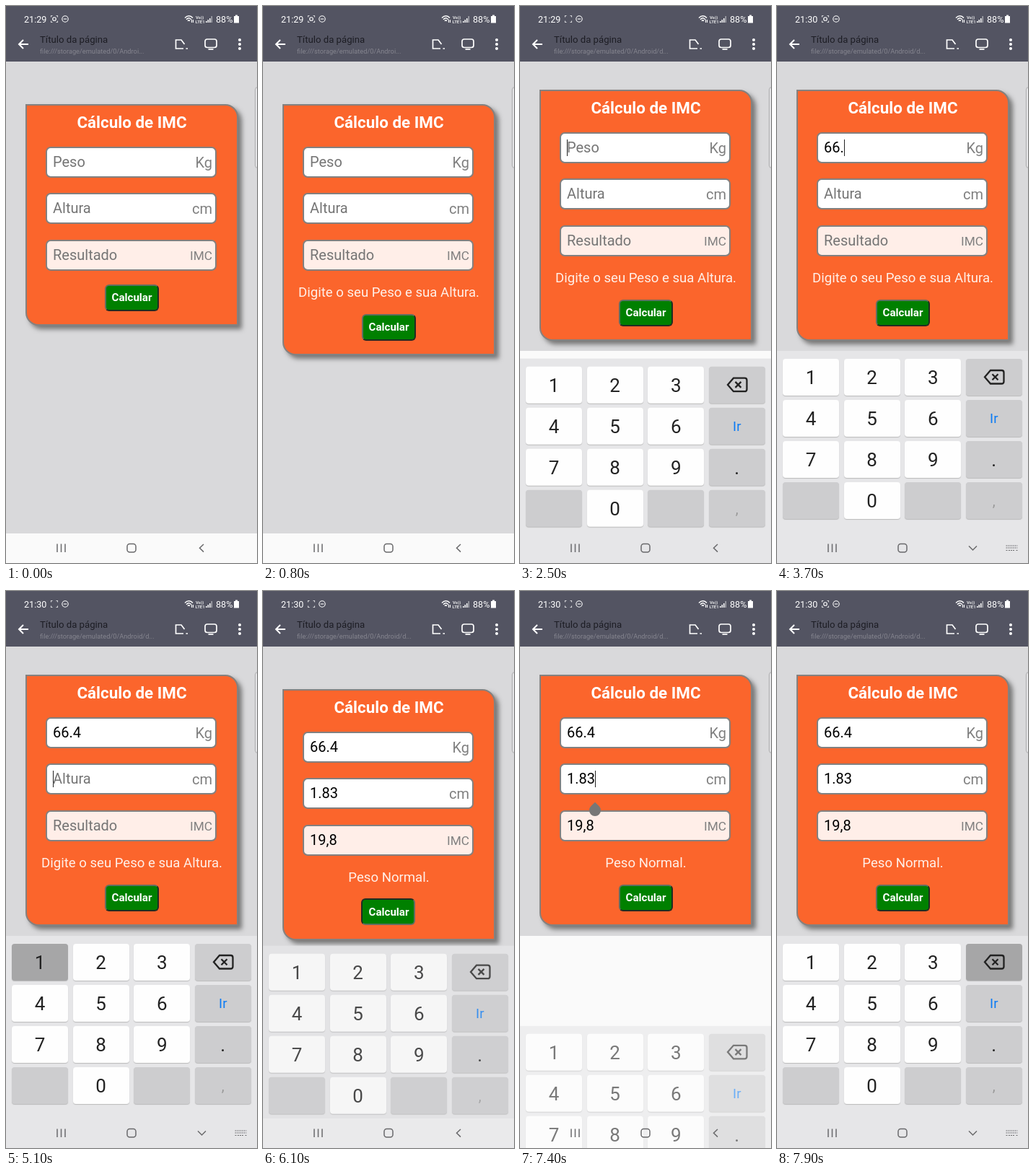
These frames come from a looping animation (348 px wide and 772 px high, 8 s). An HTML page:

```html
<!DOCTYPE html>
<html lang="pt">
<head>
<meta charset="utf-8">
<title>Cálculo de IMC</title>
<style>
* { box-sizing: border-box; }
html, body { margin: 0; width: 100%; height: 100%; overflow: hidden; background: #fafafa; }
#stage { position: relative; width: 348px; height: 772px; overflow: hidden; font-family: Roboto, sans-serif; }
#stage div, svg { position: absolute; }
svg { left: 0; top: 0; }
#page { left: 0; top: 77px; width: 348px; background: #d9d9db; overflow: hidden; }
#body { left: 0; top: 0; width: 348px; height: 654px; }
#card { left: 27px; top: 59px; width: 295px; background: #fb652c; border: 2px solid #85817f;
  border-radius: 0 18px 0 18px; box-shadow: 5px 5px 6px #777; }
#body .line { left: 0; width: 349px; text-align: center; color: #fff; }
#title { top: 70px; font: bold 22.4px/28px Roboto, sans-serif; }
#msg { top: 308px; font-size: 18.6px; line-height: 24px; color: #ffefe8 !important; }
.field { left: 55px; width: 237px; height: 43px; border: 2px solid #83807f; border-radius: 7px; background: #fff;
  padding-left: 8px; font-size: 20px; line-height: 39px; color: #000; white-space: pre; }
.field u { color: #757575; text-decoration: none; }
.field b { position: absolute; right: 4px; top: 1px; font-weight: 400; color: #808080; }
.field i { display: inline-block; width: 1.4px; height: 23px; margin-right: -1.4px; vertical-align: -5px; background: #222; }
#f2 { background: #ffeee8; }
#f2 b { font-size: 17.3px; }
#btn { left: 137px; width: 75px; height: 37px; border: 2px solid; border-color: #5f6f5f #222c22 #222c22 #5f6f5f;
  border-radius: 6px; color: #fff; font: bold 15.1px/33px Roboto, sans-serif; text-align: center; }
#btn.held { border-color: #222c22 #5f6f5f #5f6f5f #222c22; transform: translate(-1px, -1px); padding: 1px 0 0 2px; }
#drop { left: 95.5px; top: 239px; width: 16px; height: 16px; border-radius: 0 50% 50% 50%; transform: rotate(45deg); background: #777; }
#edge { left: 345px; top: 112px; width: 8px; height: 113px; border: 1px solid #aaaaac; border-radius: 4px; background: #e6e6e8; }
#kb { left: 0; top: 478px; width: 348px; height: 294px; background: #e6e6e8; }
.key { width: 78px; height: 51px; border-radius: 4px; font-size: 26px; line-height: 53px; text-align: center; color: #222;
  box-shadow: 0 1px 1px #bbb; }
</style>
</head>
<body>
<div id="stage">
  <div id="page"><div id="body">
    <div id="card"></div>
    <div id="title" class="line">Cálculo de IMC</div>
    <div id="f0" class="field" style="top:118px"></div>
    <div id="f1" class="field" style="top:182px"></div>
    <div id="f2" class="field" style="top:247px"></div>
    <div id="msg" class="line"></div>
    <div id="btn">Calcular</div>
    <div id="drop"></div>
  </div></div>
  <div id="edge"></div>
  <div id="kb"></div>
  <svg width="348" height="772" fill="none" stroke="#fff" stroke-width="2" font-family="Roboto, sans-serif">
    <path d="M0 0H348V77H0Z" fill="#535462" stroke="none"/>
    <g fill="#fff" stroke="none" font-size="12.6">
      <text id="clock" x="25" y="22.6"></text>
      <text x="291" y="22.6">88%</text>
      <g font-size="6" font-weight="bold" opacity=".85">
        <text x="263" y="17.5">Vo))</text>
        <text x="262.5" y="23.5">LTE1</text>
      </g>
      <path d="M316 14h2v-1.500h3V14h2V23.500H316Z"/>
      <path d="M277 21h1.500v2H277ZM279.500 19H281v4H279.500ZM282 17h1.500v6H282Z"/>
      <path d="M284.500 14H286v9H284.500Z" opacity=".5"/>
      <text x="47" y="51" font-size="13.2" fill="#1d1d24">Título da página</text>
      <text id="url" x="47" y="66" font-size="9.25" fill="#85858f"></text>
      <circle cx="324" cy="47" r="2"/><circle cx="324" cy="53" r="2"/><circle cx="324" cy="59" r="2"/>
    </g>
    <g stroke-width="1.1">
      <path d="M62.500 15.500V13.500H64.500M69.500 13.500H71.500V15.500M71.500 20.500V22.500H69.500M64.500 22.500H62.500V20.500" opacity=".75"/>
      <circle id="rec" cx="67" cy="18" r="2.300"/>
      <circle cx="82" cy="18" r="4.200"/><path d="M79.800 18H84.200"/>
      <path d="M248 16.500Q253.500 11 259 16.500M250 18.700Q253.500 15 257 18.700M252 20.700Q253.500 19 255 20.700" stroke-width="1.500"/>
      <path d="M257.500 19v4M259.500 19v4"/>
    </g>
    <path d="M31 53H18M24 47L18 53L24 59"/>
    <path d="M246 59H235.500V47H243L247.500 53M249.500 59H252" stroke-width="1.700"/>
    <rect x="276" y="46" width="16" height="11.500" rx="3" stroke-width="1.700"/>
    <path d="M280.500 60H287.500" stroke-width="1.700"/>
    <g stroke="#6a6a6c" stroke-width="1.500">
      <path d="M71 745.500V757M76.500 745.500V757M82 745.500V757"/>
      <rect x="168" y="745.500" width="12" height="11.500" rx="3.500"/>
      <path id="back" d="M274 746L268.500 751.300L274 756.600"/>
      <path id="down" d="M266 748.500L271.500 754L277 748.500"/>
      <path id="pad" d="M317.500 748H333.500M317.500 751H333.500M317.500 754.500H319.500M321 754.500H330M331.500 754.500H333.500" stroke-width="1.200" stroke-dasharray="2 1"/>
    </g>
  </svg>
</div>
<script>
const $ = id => document.getElementById(id);
const LOOP = 8000, CLOSE = 6045, OPENS = [2250, 7293];
const labels = ['1', '2', '3', '⌫', '4', '5', '6', 'Ir', '7', '8', '9', '.', '', '0', '', ','];
const backspace = '<svg width="78" height="51" fill="none" stroke="#222" stroke-width="2.3"><path d="M34 16H49.500Q52.500 16 52.500 19V31.500Q52.500 34.500 49.500 34.500H34L26 25.250ZM36.500 21.250L44.500 29.250M44.500 21.250L36.500 29.250"/></svg>';
// key label, press time, release time
const presses = [['6', 2950, 3080], ['6', 3200, 3300], ['.', 3500, 3600],
  ['1', 5050, 5190], ['.', 5230, 5290], ['8', 5350, 5440], ['3', 5500, 5590], ['⌫', 7850, 8000]];
// time, text
const weight = [[3080, '6'], [3300, '66'], [3600, '66.'], [3900, '66.4']];
const height = [[5190, '1'], [5290, '1.'], [5440, '1.8'], [5590, '1.83']];

const keys = labels.map((label, i) => {
  const key = document.createElement('div');
  key.className = 'key';
  key.style.left = 8 + i % 4 * 84.6 + 'px';
  key.style.top = 10.5 + (i >> 2) * 57 + 'px';
  if (label === '⌫') key.innerHTML = backspace;
  else key.textContent = label;
  if (label === 'Ir') Object.assign(key.style, { color: '#0b7bf5', fontSize: '18.6px' });
  if (label === ',') Object.assign(key.style, { color: '#999', fontSize: '20px' });
  $('kb').append(key);
  return { key, label, base: i % 4 === 3 || !label ? '#cdcdcf' : '#fefefe' };
});

const within = (t, a, b) => t >= a && t < b;
const latest = (steps, t) => steps.filter(s => s[0] <= t).pop() || [0, ''];
const show = (id, on) => $(id).style.visibility = on ? 'visible' : 'hidden';

function field(id, text, hint, unit, caret) {
  const bar = caret ? '<i></i>' : '';
  const html = (text ? text + bar : `${bar}<u>${hint}</u>`) + `<b>${unit}</b>`;
  const el = $(id);
  if (el.last !== html) el.innerHTML = el.last = html;
}

function drawKeyboard(t) {
  let shift = 294, alpha = 0, open = false;
  if (within(t, CLOSE, CLOSE + 260)) {
    const q = (t - CLOSE) / 260;
    shift = 294 * q * q;
    alpha = 1 - q;
  } else if (within(t, OPENS[0], CLOSE) || t >= OPENS[1]) {
    const p = Math.min(1, (t - OPENS[t < CLOSE ? 0 : 1]) / 310);
    shift = 294 * (1 - p) ** 2;
    alpha = Math.min(1, p * 1.7);
    open = p === 1;
  }
  $('kb').style.transform = `translateY(${shift}px)`;
  $('kb').style.opacity = alpha;
  show('back', !open);
  show('down', open);
  show('pad', open);
  for (const { key, label, base } of keys) {
    const held = presses.some(p => p[0] === label && within(t, p[1], p[2]));
    key.style.background = held ? '#a6a6a7' : base;
  }
}

function drawForm(t) {
  const w = latest(weight, t), h = latest(height, t), done = t >= 5950;
  const focus = within(t, 2150, 4100) ? 0 : within(t, 4100, 5900) || t >= 7250 ? 1 : -1;
  const since = t >= 7250 ? 7250 : focus ? Math.max(4100, h[0]) : Math.max(2150, w[0]);
  const lit = (t - since) % 1000 < 500;
  field('f0', w[1], 'Peso', 'Kg', focus === 0 && lit);
  field('f1', h[1], 'Altura', 'cm', focus === 1 && lit);
  field('f2', done ? '19,8' : '', 'Resultado', 'IMC', false);

  const asked = t >= 600, small = within(t, OPENS[0], CLOSE) || t >= OPENS[1];
  $('msg').textContent = done ? 'Peso Normal.' : asked ? 'Digite o seu Peso e sua Altura.' : '';
  $('card').style.height = (asked ? 348 : 307) + 'px';
  $('page').style.height = (small ? 401 : 654) + 'px';
  $('body').style.top = (small ? -20 : 0) + 'px';
  $('btn').style.top = (asked ? 350 : 309) + 'px';
  $('btn').style.background = within(t, 1100, 2000) ? '#009800' : '#008000';
  $('btn').className = within(t, 450, 650) || within(t, 5850, 6200) ? 'held' : '';
  show('drop', within(t, 7250, 7750));
}

function frame(now) {
  const t = now % LOOP;
  drawKeyboard(t);
  drawForm(t);
  $('clock').textContent = t < 2950 ? '21:29' : '21:30';
  $('url').textContent = 'file:///storage/emulated/0/' + (t < 2250 ? 'Androi...' : 'Android/d...');
  const phase = t % 1000;
  show('rec', phase >= 580 || phase < 80);
  requestAnimationFrame(frame);
}
requestAnimationFrame(frame);
</script>
</body>
</html>
```
